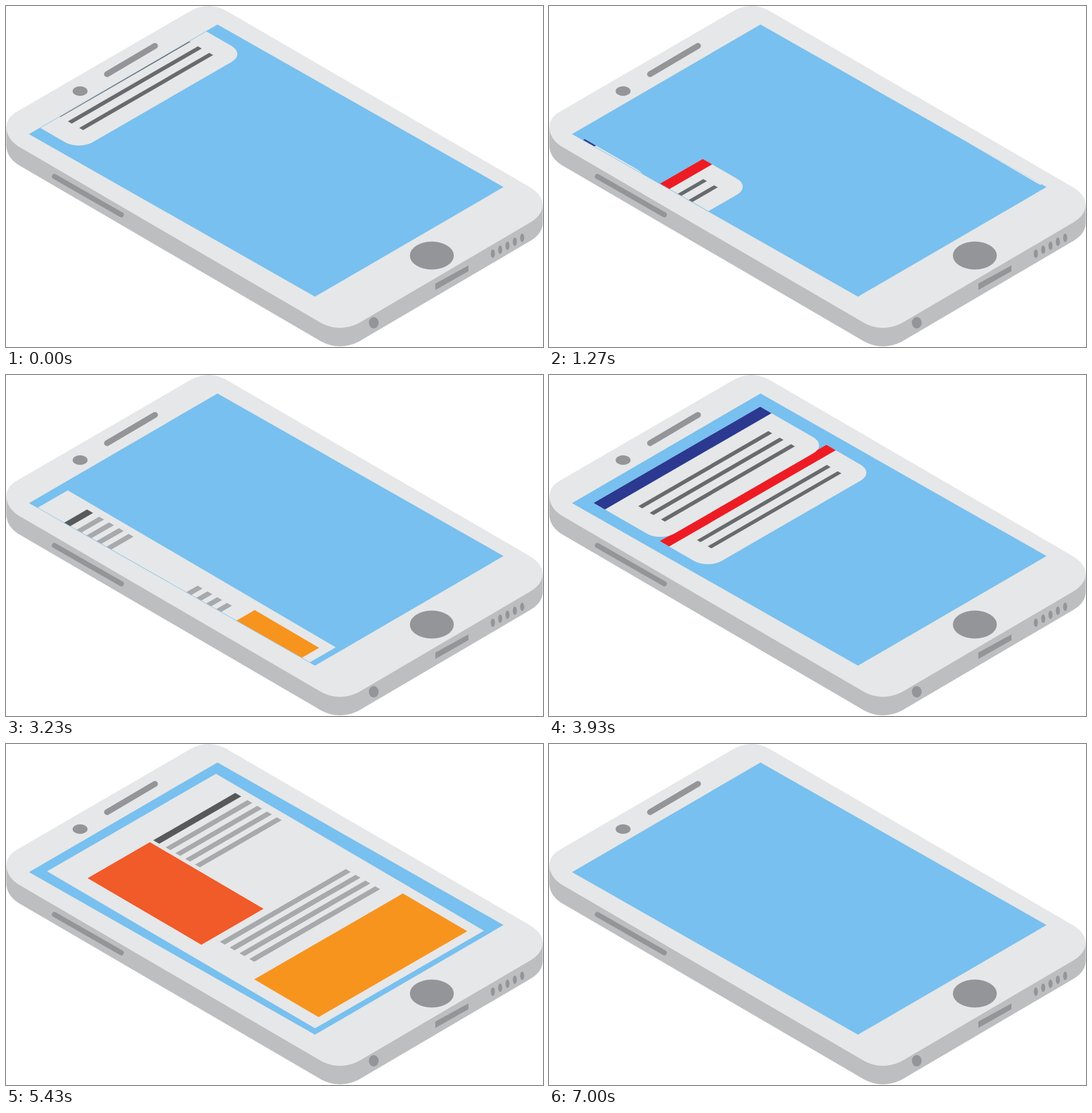
These frames come from a looping animation (843 by 535 pixels, 7230 ms). An HTML page:

```html
<!DOCTYPE html>
<html lang="en">
<head>
<meta charset="utf-8">
<title>Phone notifications</title>
<style>
html, body { margin: 0; width: 100%; height: 100%; overflow: hidden; background: #fff; }
svg { display: block; width: 100%; height: 100%; }
</style>
</head>
<body>
<svg viewBox="0 0 843 535" xmlns="http://www.w3.org/2000/svg">
  <defs>
    <clipPath id="glass"><path d="M37.4 201 332 29.8 781 284 485.6 455.4Z"/></clipPath>
  </defs>

  <!-- body -->
  <path fill="#bcbec0" d="M.5 190V219Q1 237 19 249L496 527Q524 541 553 527L824 368Q842 357 842.5 341V312Z"/>
  <path fill="#e6e7e8" d="M15 167 291 7Q318-7 345 7L822 284Q842 296 842.5 312 842 328 824 339L553 498Q524 512 496 498L19 220Q1 208 .5 190 1 176 15 167Z"/>
  <g fill="#939598" stroke="none">
    <path d="M158.5 107 234 62.5" stroke="#939598" stroke-width="9" stroke-linecap="round"/>
    <path d="M76 267.5 181 327.5" stroke="#939598" stroke-width="8" stroke-linecap="round"/>
    <ellipse cx="116.3" cy="133.5" rx="11.7" ry="7.5"/>
    <ellipse cx="668.5" cy="391.5" rx="34.5" ry="22"/>
    <ellipse cx="577.3" cy="497" rx="7.7" ry="9"/>
    <path d="M674 435.5 726 407V416L674 445.5Z"/>
    <g id="holes"></g>
  </g>

  <!-- screen -->
  <path fill="#78c0ef" d="M36 201 332 29 781 284 485 456Z"/>
  <g clip-path="url(#glass)">
    <g transform="matrix(.866 -.5 .866 .5 36 201)">
      <g id="card2"></g>
      <g id="card1"></g>
    </g>
    <g transform="matrix(.866 -.5 .86 .5035 36 201)">
      <g id="page"></g>
    </g>
  </g>
</svg>
<script>
const STEP = 1000 / 30, FRAMES = 217, CYCLE = 109;
const el = id => document.getElementById(id);

const rect = (x1, y1, x2, y2, fill) =>
  `<rect x="${x1}" y="${y1}" width="${x2 - x1}" height="${y2 - y1}" fill="${fill}"/>`;

const bars = (n, x1, x2, y, gap, h, fill) =>
  Array.from({ length: n }, (_, i) => rect(x1, y + i * gap, x2, y + i * gap + h, fill)).join('');

// Card with square top corners and round bottom corners
const card = (top, bottom, head, color) =>
  `<path fill="#e6e7e8" d="M20 ${top}H322V${bottom - 25}a25 25 0 0 1-25 25H45a25 25 0 0 1-25-25Z"/>` +
  rect(20, top, 322, top + head, color);

el('card1').innerHTML = card(19.3, 140.7, 20.5, '#2b3990') + bars(3, 55.3, 291, 65, 20.6, 7, '#696a6d');
el('card2').innerHTML = card(157.5, 244.6, 17, '#ed1c24') + bars(2, 55.3, 291, 189.5, 19.6, 6.6, '#696a6d');
el('page').innerHTML =
  rect(17.8, 15.2, 324, 504.3, '#e6e7e8') +
  rect(163, 62.8, 311.6, 73.7, '#58595b') +
  bars(4, 163.3, 311.7, 85, 17.9, 8.8, '#a7a9ac') +
  rect(44.2, 62.7, 157, 270.2, '#f15a29') +
  bars(4, 65.8, 294, 282.3, 17.9, 9, '#a7a9ac') +
  rect(38.5, 372.5, 308, 490, '#f7941e');
el('holes').innerHTML = [0, 1, 2, 3, 4].map(i =>
  `<ellipse cx="${764.3 + 11.5 * i}" cy="${388.5 - 6.2 * i}" rx="3.2" ry="6.6"/>`).join('');

const progress = (t, start, dur) => Math.min(1, Math.max(0, (t - start) / dur));
const out = (p, n) => 1 - (1 - p) ** n;

// Cubic bezier ease with control points (a, 0) and (b, 1)
function ease(p, a, b) {
  let lo = 0, hi = 1;
  for (let i = 0; i < 24; i++) {
    const s = (lo + hi) / 2, r = 1 - s;
    if (3 * a * s * r * r + 3 * b * s * s * r + s ** 3 < p) lo = s; else hi = s;
  }
  return lo * lo * (3 - 2 * lo);
}

function place(id, x, y, shown) {
  el(id).setAttribute('transform', `translate(${x.toFixed(2)} ${y.toFixed(2)})`);
  el(id).setAttribute('visibility', shown ? 'visible' : 'hidden');
}

function draw(ms) {
  const frame = Math.floor(ms * 30 / 1000 + .2) % FRAMES;
  const t = frame % CYCLE * STEP;

  const exit1 = progress(t, 900, 395), exit2 = progress(t, 1035, 395);
  place('card1', -320 * ease(exit1, .35, .45), -70.3 * (1 - out(progress(t, 0, 350), 4)), exit1 < 1);
  place('card2', -320 * ease(exit2, .35, .45), -105 * (1 - out(progress(t, 130, 480), 4)), t >= 130 && exit2 < 1);

  const enter = progress(t, 1240, 560), leave = progress(t, 3000, 366);
  place('page', 335 * (1 - ease(enter, .25, .15)) - 328 * ease(leave, .35, .45), 0, enter > 0 && leave < 1);
}

const begin = performance.now();
function tick() {
  draw((performance.now() - begin) % 7230);
  requestAnimationFrame(tick);
}
draw(0);
requestAnimationFrame(tick);
</script>
</body>
</html>
```
